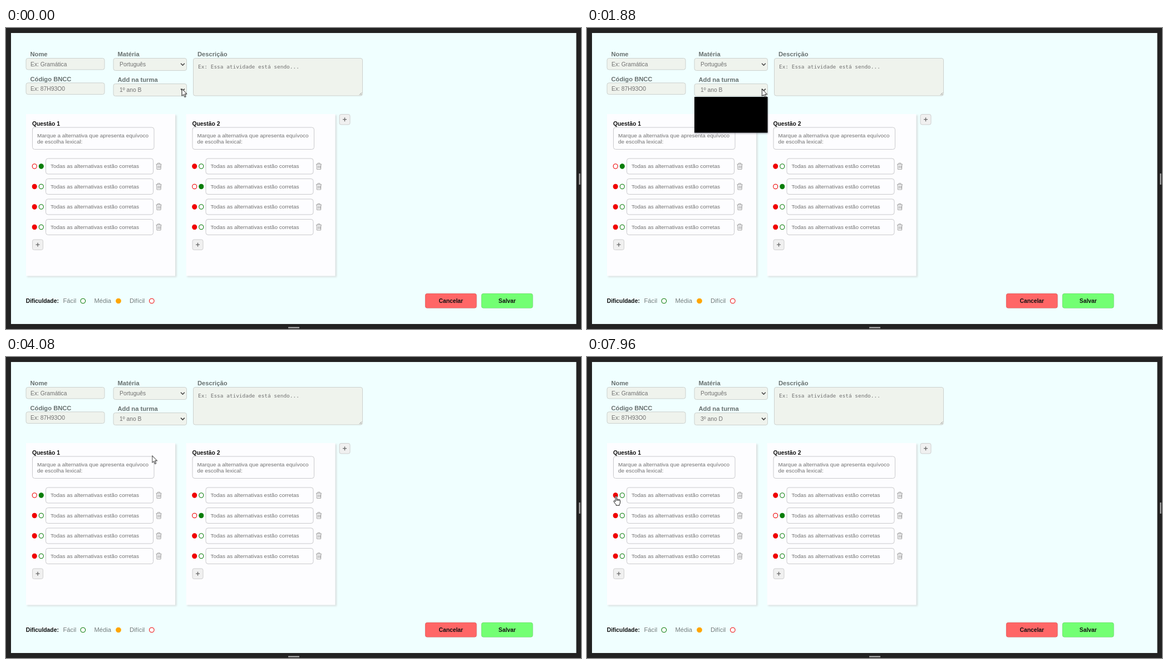
These frames come from a looping animation (1033x542 px, 8000 ms). An HTML page:

```html
<!DOCTYPE html>
<html lang="pt-BR">
<head>
<meta charset="utf-8">
<title>Editor de atividade</title>
<style>
html, body { margin: 0; width: 100%; height: 100%; overflow: hidden; background: #222; }
svg { display: block; width: 100%; height: 100%; }
text { font: 10.35px "Liberation Sans", Arial, sans-serif; fill: #717171; white-space: pre; }
.label { font-size: 11.2px; font-weight: bold; fill: #68706f; }
.level { font-size: 11.2px; fill: #747c7c; }
.strong { font-weight: bold; fill: #111; }
.small { font-size: 9.95px; }
.mono { font: 9.45px "DejaVu Sans Mono", monospace; }
.mid { text-anchor: middle; }
.field { fill: #eff3ed; stroke: #ccd1ce; }
.box { fill: #fdfdff; stroke: #c9c9cc; }
.line { fill: none; stroke: #444; stroke-width: 1.6; }
.trash { fill: none; stroke: #a2a2a2; }
.lit text { fill: #fff; }

/* 1% of the loop is 80 ms */
.anim, #pointer { animation: 8s step-end infinite; }
#pointer { animation-name: travel; }
#blank { animation-name: blank; }
#menu { animation-name: menu; }
#litB { animation-name: litB; }
#litD { animation-name: litD; }
#before { animation-name: before; }
#after { animation-name: after; }
#wrongOff { animation-name: wrongOff; }
#wrongOn { animation-name: wrongOn; }
#arrow { animation-name: arrow; }
#hand { animation-name: hand; }

@keyframes travel {
  0% { transform: translate(316px, 109.5px); }
  5.25% { transform: translate(314.5px, 110px); }
  33.75% { transform: translate(314.5px, 110px); animation-timing-function: steps(5, start); }
  40% { transform: translate(262.5px, 177.5px); }
  55.25% { transform: translate(262.5px, 177.5px); animation-timing-function: steps(6, start); }
  63% { transform: translate(211px, 196px); }
  68.75% { transform: translate(200px, 198px); }
  71.875% { transform: translate(199.5px, 197.5px); }
  75.5% { transform: translate(199.5px, 197.5px); animation-timing-function: steps(8, start); }
  85% { transform: translate(53px, 250px); }
  100% { transform: translate(53px, 250px); }
}
@keyframes blank { 0%, 26.625%, 100% { visibility: hidden; } 23.5% { visibility: visible; } }
@keyframes menu { 0%, 49.5%, 100% { visibility: hidden; } 26.625% { visibility: visible; } }
@keyframes litB { 0%, 43.25%, 100% { visibility: hidden; } 26.625% { visibility: visible; } }
@keyframes litD { 0%, 49.5%, 100% { visibility: hidden; } 43.25% { visibility: visible; } }
@keyframes before { 0% { visibility: visible; } 52.125%, 100% { visibility: hidden; } }
@keyframes after { 0% { visibility: hidden; } 52.125%, 100% { visibility: visible; } }
@keyframes wrongOff { 0% { visibility: visible; } 98.5%, 100% { visibility: hidden; } }
@keyframes wrongOn { 0% { visibility: hidden; } 98.5%, 100% { visibility: visible; } }
@keyframes arrow { 0% { visibility: visible; } 83.875%, 100% { visibility: hidden; } }
@keyframes hand { 0% { visibility: hidden; } 83.875%, 100% { visibility: visible; } }
</style>
</head>
<body>
<svg id="stage" viewBox="0 0 1033 542" preserveAspectRatio="none"></svg>
<script>
const text = (x, y, str, cls = '') => `<text x="${x}" y="${y}" class="${cls}">${str}</text>`;
const rect = (x, y, w, h, attrs, r = 0) =>
  `<rect x="${x}" y="${y}" width="${w}" height="${h}" rx="${r}" ${attrs}/>`;
const group = (id, body, cls = '') => `<g id="${id}" class="anim ${cls}">${body}</g>`;
const field = (x, y, w, h) => rect(x, y, w, h, 'class="field"', 3.5);
const dot = (x, y, color, full, rx = 4) =>
  `<ellipse cx="${x}" cy="${y}" rx="${rx}" ry="4.3" fill="${full ? color : '#fdfdff'}" stroke="${color}" stroke-width="1.1"/>`;
const chevron = y => `<path class="line" d="M314 ${y - 1.7}l3.4 3.4 3.4-3.4"/>`;
const plus = (x, y) => rect(x + .5, y + .5, 19, 18.5, 'fill="#f0f0f0" stroke="#cfcfcf"', 3) +
  `<path d="M${x + 6.5} ${y + 9.7}h7m-3.5-3.5v7" stroke="#666" stroke-width="1.3"/>`;
const trash = (x, y) => `<path class="trash" d="M${x} ${y - 3.7}h10m-7 0v-2h4v2m-6 0l.5 9.2h7l.5-9.2m-5.5 2.2v5m2 -5v5m2-5v5"/>`;
const marks = (y, right) => dot(51.2, y, '#f00000', !right) + dot(63.3, y, '#087d08', right);

function card(number, dx, correct) {
  let out = rect(38, 157, 268.5, 291.5, 'fill="#d9e0e0" filter="url(#soft)"') +
    rect(36, 155, 268, 291.5, 'fill="#fdfdff"') +
    text(47, 176.3, 'Questão ' + number, 'strong') +
    rect(47.5, 179, 218.5, 39.5, 'class="box"', 4) +
    text(56, 196.6, 'Marque a alternativa que apresenta equívoco', 'small') +
    text(56, 208.4, 'de escolha lexical:', 'small');
  for (let i = 0; i < 4; i++) {
    const y = 249 + 36.5 * i;
    if (number === 1 && i === 0)
      out += group('wrongOff', marks(y, true)) + group('wrongOn', marks(y, false));
    else out += marks(y, i === correct);
    out += rect(71.5, y - 14, 193, 28, 'class="box"', 4) +
      text(80, y + 3.4, 'Todas as alternativas estão corretas', 'small') + trash(269.5, y);
  }
  return `<g transform="translate(${dx})">${out}${plus(47, 380.5)}</g>`;
}

const classes = ['1º ano A', '1º ano B', '2º ano A', '3º ano C', '3º ano D'];
const option = i => text(204.5, 133 + 12.8 * i, classes[i]);
const lit = (id, i) => group(id, rect(193.5, 123.6 + 12.8 * i, 130.5, 12.8, 'fill="#a4daf0"') + option(i), 'lit');
const menuShadow = rect(193, 125, 132, 65, 'fill="#667" opacity=".55" filter="url(#soft)"');
const button = (x, color, label) => rect(x, 478, 92.5, 26.5, `fill="${color}" stroke="#000" stroke-opacity=".12"`, 4) +
  text(x + 46.3, 494.8, label, 'strong mid');

document.getElementById('stage').innerHTML = `
  <defs><filter id="soft" x="-10%" y="-10%" width="120%" height="120%"><feGaussianBlur stdDeviation="1.5"/></filter></defs>
  ${rect(0, 0, 1033, 542, 'fill="#222"')}
  ${rect(9, 9, 1015.5, 524, 'fill="#f0ffff"')}
  ${rect(1029.5, 262, 2, 20, 'fill="#bbb"')}
  ${rect(507, 538.5, 20, 2, 'fill="#bbb"')}
  ${text(43.5, 51, 'Nome', 'label')}${field(36, 54.5, 141, 20.5)}${text(44, 68.6, 'Ex: Gramática')}
  ${text(43.5, 95.6, 'Código BNCC', 'label')}${field(36, 98.8, 141, 20.7)}${text(44, 112.7, 'Ex: 87H93O0')}
  ${text(200.5, 51, 'Matéria', 'label')}${field(193, 54.5, 131.5, 22)}${text(204, 69, 'Português')}${chevron(65.5)}
  ${text(200.5, 97, 'Add na turma', 'label')}${field(193, 100.5, 131.5, 22)}${chevron(111.3)}
  ${group('before', text(204, 115, classes[1]))}${group('after', text(204, 115, classes[4]))}
  ${text(344, 51, 'Descrição', 'label')}${field(336.5, 54.5, 304, 67.5)}
  ${text(345, 72.6, 'Ex: Essa atividade está sendo...', 'mono')}
  <path d="M635 120.5l4-4m-1.5 4l1.5-1.5" stroke="#777" stroke-width=".8"/>
  ${card(1, 0, 0)}${card(2, 287.5, 1)}${plus(598.5, 155)}
  ${text(35.7, 494.8, 'Dificuldade:', 'strong')}
  ${text(102.5, 495.4, 'Fácil', 'level')}${dot(138.3, 491.5, '#087d08', false, 4.3)}
  ${text(158.5, 495.4, 'Média', 'level')}${dot(202, 491.5, '#ffa500', true, 4.3)}
  ${text(222, 495.4, 'Difícil', 'level')}${dot(261.8, 491.5, '#f01010', false, 4.3)}
  ${button(753, '#ff6666', 'Cancelar')}${button(854, '#73ff73', 'Salvar')}
  ${group('blank', menuShadow + rect(193, 124, 131.5, 64.5, 'fill="#000"'))}
  ${group('menu', menuShadow + rect(193, 123, 131.5, 65.5, 'fill="#f0f3ee" stroke="#6d7482"') +
    classes.map((_, i) => option(i)).join(''))}
  ${lit('litB', 1)}${lit('litD', 4)}
  <g id="pointer" stroke="#111" fill="#fff" stroke-linejoin="round">
    ${group('arrow', '<path d="M0 0v12.8l2.9-2.7 2.2 4.9 2.1-.9-2.2-4.8h4z"/>')}
    ${group('hand', '<path d="M-2 9v-7.500q0-1.500 1.200-1.500t1.200 1.500v4.500q1.100-.8 2 .4 1.100-.7 2 .5 1.900-.7 2.100 1.300v4q0 2-1.300 3.500v1.500h-6v-1.500q-2.500-2.500-4-5.300-.6-1.500.6-1.600 1 .1 2.200 1.700zM.4 6v3m2-2.600v2.600m2-2v2"/>')}
  </g>`;
</script>
</body>
</html>
```
